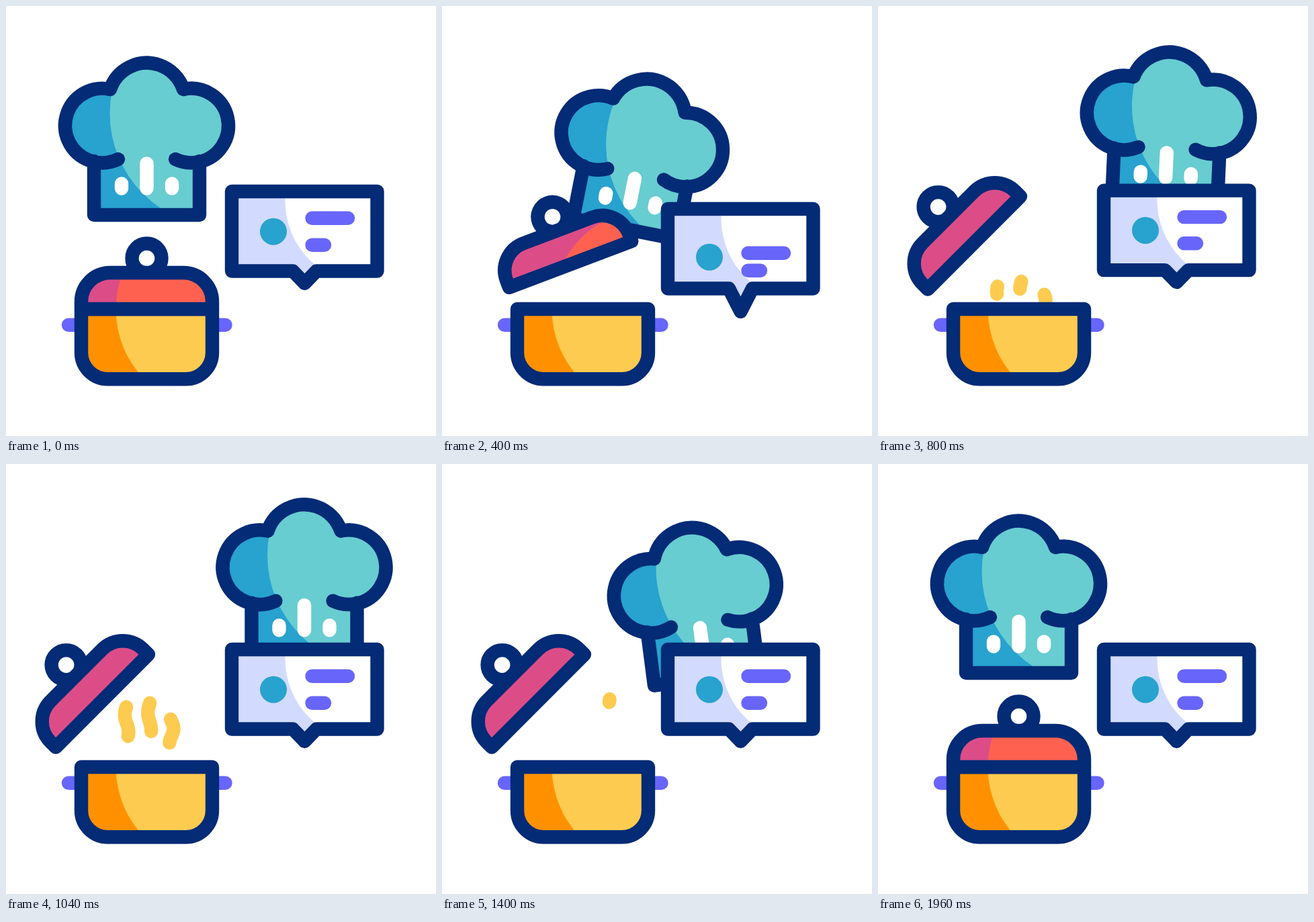
Write an HTML page with a canvas that moves like this. It is 640x640 px and loops after 2 s.

```html
<!DOCTYPE html>
<html lang="en">
<head>
<meta charset="utf-8">
<title>Cooking loop</title>
<style>
  html, body { margin: 0; width: 100%; height: 100%; overflow: hidden; background: #fff; }
  canvas { display: block; width: 640px; height: 640px; }
</style>
</head>
<body>
<canvas id="stage"></canvas>
<script>
const LOOP = 2000, SIZE = 640, LINE = 20.4, TAU = Math.PI * 2, DEG = Math.PI / 180;
const C = {
  navy: '#032b76', blue: '#28a2ce', teal: '#67cdd1', pale: '#d2dbfd', violet: '#6865fb',
  pink: '#dc4d88', coral: '#ff6150', orange: '#ff9100', yellow: '#fdcb50', white: '#ffffff'
};

const canvas = document.getElementById('stage');
const g = canvas.getContext('2d');
const dpr = window.devicePixelRatio || 1;
canvas.width = canvas.height = SIZE * dpr;

const clamp = v => Math.min(1, Math.max(0, v));
const smooth = u => u * u * (3 - 2 * u);
const ramp = (t, a, b) => smooth(clamp((t - a) / (b - a)));

// Ease with a longer settling tail: cubic-bezier(1/3, 0, 1/2, 1).
function settle(t, a, b) {
  const x = clamp((t - a) / (b - a));
  let lo = 0, hi = 1;
  for (let i = 0; i < 24; i++) {
    const u = (lo + hi) / 2, v = 1 - u;
    if (v * v * u + 1.5 * v * u * u + u * u * u < x) lo = u; else hi = u;
  }
  return smooth((lo + hi) / 2);
}

// Smooth interpolation through [time, value] pairs.
function keys(t, list) {
  if (t <= list[0][0]) return list[0][1];
  for (let i = 1; i < list.length; i++) {
    const [a, p] = list[i - 1], [b, q] = list[i];
    if (t < b) return p + (q - p) * ramp(t, a, b);
  }
  return list[list.length - 1][1];
}

function base() {
  g.setTransform(dpr, 0, 0, dpr, 0, 0);
}

function place(x, y, angle) {
  g.translate(x, y);
  g.rotate(angle * DEG);
}

function disc(x, y, r, color) {
  g.beginPath();
  g.arc(x, y, r, 0, TAU);
  g.fillStyle = color;
  g.fill();
}

function stroke(path, color = C.navy) {
  g.lineWidth = LINE;
  g.lineCap = g.lineJoin = 'round';
  g.strokeStyle = color;
  g.stroke(path);
}

function bar(x1, y1, x2, y2, color) {
  const p = new Path2D();
  p.moveTo(x1, y1);
  p.lineTo(x2, y2);
  stroke(p, color);
}

// Two-tone fill: a shade with a large lit circle inside the shape.
function tones(path, shade, light, x, y, r, fixed) {
  g.save();
  g.clip(path);
  g.fillStyle = shade;
  g.fill(path);
  if (fixed) base();
  disc(x, y, r, light);
  g.restore();
}

const hatFill = new Path2D();
for (const [x, y, r] of [[-66.2, 0, 55.3], [66.2, 0, 55.3], [0, -35.9, 57.4]]) {
  hatFill.moveTo(x + r, y);
  hatFill.arc(x, y, r, 0, TAU);
}
hatFill.rect(-78.5, -30, 157, 163);

const hatLine = new Path2D();
hatLine.arc(-66.2, 0, 55.3, 64.7 * DEG, 282.2 * DEG);
hatLine.arc(0, -35.9, 57.4, 198.4 * DEG, 341.6 * DEG);
hatLine.arc(66.2, 0, 55.3, 257.8 * DEG, 475.3 * DEG);
hatLine.moveTo(-78.5, 53);
hatLine.lineTo(-78.5, 133);
hatLine.lineTo(78.5, 133);
hatLine.lineTo(78.5, 53);

const lidPath = new Path2D();
lidPath.moveTo(-97.5, 0);
lidPath.arcTo(-97.5, -54, 0, -54, 43);
lidPath.arcTo(97.5, -54, 97.5, 0, 43);
lidPath.lineTo(97.5, 0);
lidPath.closePath();

const potPath = new Path2D();
potPath.moveTo(112, 451);
potPath.arcTo(112, 555.3, 209, 555.3, 39.5);
potPath.arcTo(307, 555.3, 307, 451, 39.5);
potPath.lineTo(307, 451);
potPath.closePath();

function drawHat(t) {
  const going = t < 1100;
  const s = going ? settle(t, 73, 966) : 1 - settle(t, 1167, 1911);
  const arc = 4 * s * (1 - s);
  const dip = going ? 33 + 4 * s : 38.4 - 7.4 * s;
  const tilt = going ? 10.8 + 2.8 * s : -9;
  g.save();
  place(209.5 + 234.5 * s, 178 - 24.3 * s + dip * arc, tilt * arc);
  tones(hatFill, C.blue, C.teal, 114, -18, 169);
  bar(-37.5, 86.5, -37.5, 93.5, C.white);
  bar(0, 56.5, 0, 93.5, C.white);
  bar(37.5, 86.5, 37.5, 93.5, C.white);
  stroke(hatLine);
  g.restore();
}

// A wavy wisp drawn between its tail and head heights.
function wisp(x, amp, peak, half, from, len, head, tail) {
  if (head - tail < 0.004) return;
  const p = new Path2D();
  for (let i = 0; i <= 30; i++) {
    const y = from - len * (tail + (head - tail) * i / 30);
    p.lineTo(x + amp * Math.cos(Math.PI * (y - peak) / half), y);
  }
  stroke(p, C.yellow);
}

function drawSteam(t) {
  const head = ramp(t, 679, 1239), tail = ramp(t, 870, 1390);
  wisp(179.6, 2.8, 399, 26, 428.6, 94, head, tail);
  wisp(213.7, 2.5, 396, 26, 421, 91.7, head, tail);
  wisp(246.4, 3.1, 394, 22, 440, 90, ramp(t, 672, 1272), ramp(t, 797, 1495));
}

function drawPot() {
  bar(93, 474.7, 326.5, 474.7, C.violet);
  tones(potPath, C.orange, C.yellow, 313.5, 451, 150);
  stroke(potPath);
}

function drawLid(t) {
  const p = ramp(t, 111, 722) - ramp(t, 1400, 1915);
  const dx = 1 - Math.pow(1 - Math.pow(p, 2.2), 1.62);
  const dy = 1 - Math.pow(1 - p, 1.83);
  g.save();
  place(209.5 - 66.5 * dx, 451 - 98.5 * dy, -45 * p);
  disc(0, -75.5, 22, C.white);
  const knob = new Path2D();
  knob.arc(0, -75.5, 22, 0, TAU);
  stroke(knob);
  tones(lidPath, C.pink, C.coral, 313.5, 451, 150, true);
  stroke(lidPath);
  g.restore();
}

function drawCard(t) {
  const bounce = (down, up) => keys(t, [[100, 0], [400, down], [600, up], [840, 0]]);
  const d = bounce(26, -18);
  const top = 276 + d, low = 394.5 + d;
  const p = new Path2D();
  p.moveTo(336, top);
  p.lineTo(552.5, top);
  p.lineTo(552.5, low);
  p.lineTo(462, low);
  p.lineTo(444.5, 412.8 + bounce(42, -23.5));
  p.lineTo(427, low);
  p.lineTo(336, low);
  p.closePath();
  tones(p, C.pale, C.white, 540, 290 + d, 124.5);
  disc(398, 335.7 + bounce(38, -24), 20, C.blue);
  const y1 = 315.8 + bounce(52, -22), y2 = 355.8 + bounce(38, -35);
  bar(455.5, y1, 509, y1, C.violet);
  bar(455.5, y2, 474, y2, C.violet);
  stroke(p);
}

function frame(now) {
  const t = now % LOOP;
  base();
  g.fillStyle = C.white;
  g.fillRect(0, 0, SIZE, SIZE);
  drawHat(t);
  drawSteam(t);
  drawPot();
  drawLid(t);
  drawCard(t);
}

let start = null;
function tick(now) {
  if (start === null) start = now;
  frame(Math.max(0, now - start));
  requestAnimationFrame(tick);
}
frame(0);
requestAnimationFrame(tick);
</script>
</body>
</html>
```
